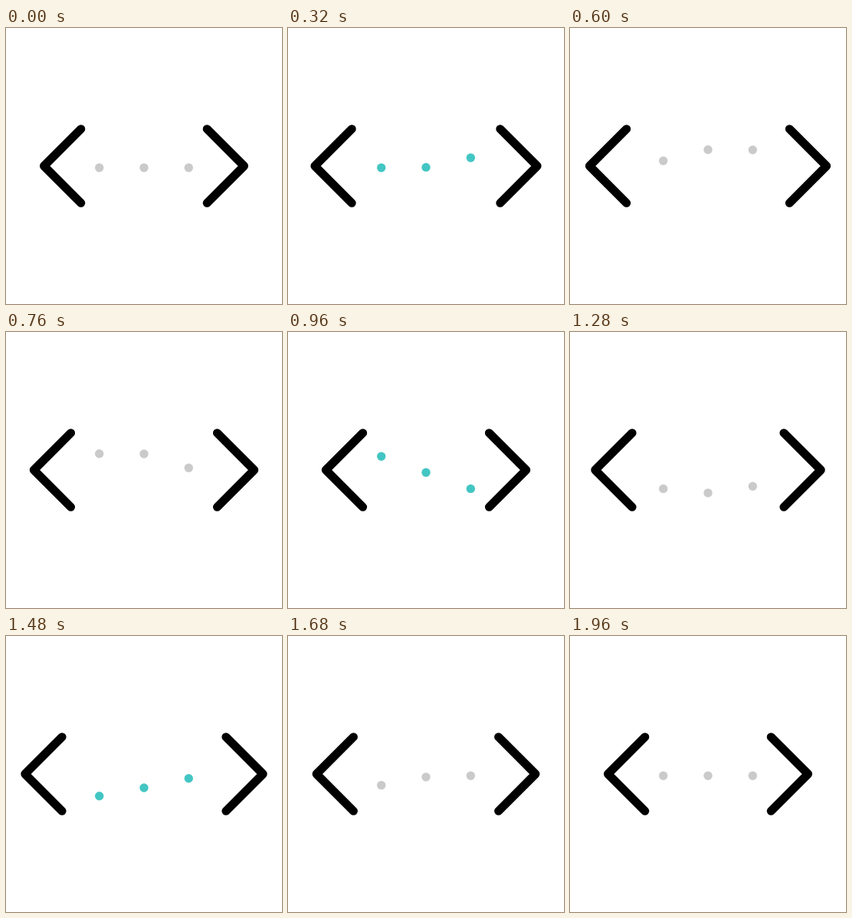
These frames come from a looping animation (360x360 px, 2 s). An HTML page with a canvas:

```html
<!DOCTYPE html>
<html lang="en">
<head>
<meta charset="utf-8">
<title>Code brackets loader</title>
<style>
  html, body { margin: 0; width: 100%; height: 100%; overflow: hidden; background: #fff; }
  canvas { display: block; width: 360px; height: 360px; }
</style>
</head>
<body>
<canvas id="stage" width="360" height="360"></canvas>
<script>
const ctx = document.getElementById('stage').getContext('2d');
const LOOP = 2000, STEP = 40;
const GREY = '#cacaca', TEAL = '#43c6c3';

// Keys are [time, value] pairs
const SPREAD = [[40, 0], [540, 24.7], [560, 24.7], [980, 0], [1464, 24.7], [1490, 24.7], [1870, 0]];
const BOB = [[120, 0], [520, -26], [1080, 28], [1600, 0]];
const LAG = 160;

const smooth = x => x * x * (3 - 2 * x);
const cosine = x => (1 - Math.cos(Math.PI * x)) / 2;

function track(keys, t, ease) {
  if (t <= keys[0][0]) return keys[0][1];
  for (let i = 1; i < keys.length; i++) {
    const [t0, v0] = keys[i - 1], [t1, v1] = keys[i];
    if (t < t1) return v0 + (v1 - v0) * ease((t - t0) / (t1 - t0));
  }
  return keys[keys.length - 1][1];
}

function dotColor(t) {
  const beat = Math.floor((t - 195) / 290);
  return beat >= 0 && beat < 6 && beat % 2 === 0 ? TEAL : GREY;
}

function bracket(side, shift) {
  const tip = 180 + side * (130.5 + shift);
  const end = tip - side * 48.3;
  ctx.beginPath();
  ctx.moveTo(end, 131.7);
  ctx.lineTo(tip, 180);
  ctx.lineTo(end, 228.3);
  ctx.stroke();
}

function draw(t) {
  ctx.fillStyle = '#fff';
  ctx.fillRect(0, 0, 360, 360);

  ctx.strokeStyle = '#000';
  ctx.lineWidth = 11;
  ctx.lineCap = ctx.lineJoin = 'round';
  const shift = track(SPREAD, t, smooth);
  bracket(-1, shift);
  bracket(1, shift);

  ctx.fillStyle = dotColor(t);
  for (let i = 0; i < 3; i++) {
    const y = 182.3 + track(BOB, t - i * LAG, cosine);
    ctx.beginPath();
    ctx.arc(238.3 - i * 58.3, y, 5.7, 0, Math.PI * 2);
    ctx.fill();
  }
}

function tick() {
  const t = performance.now() % LOOP;
  draw(Math.floor(t / STEP) * STEP);
  requestAnimationFrame(tick);
}
tick();
</script>
</body>
</html>
```
